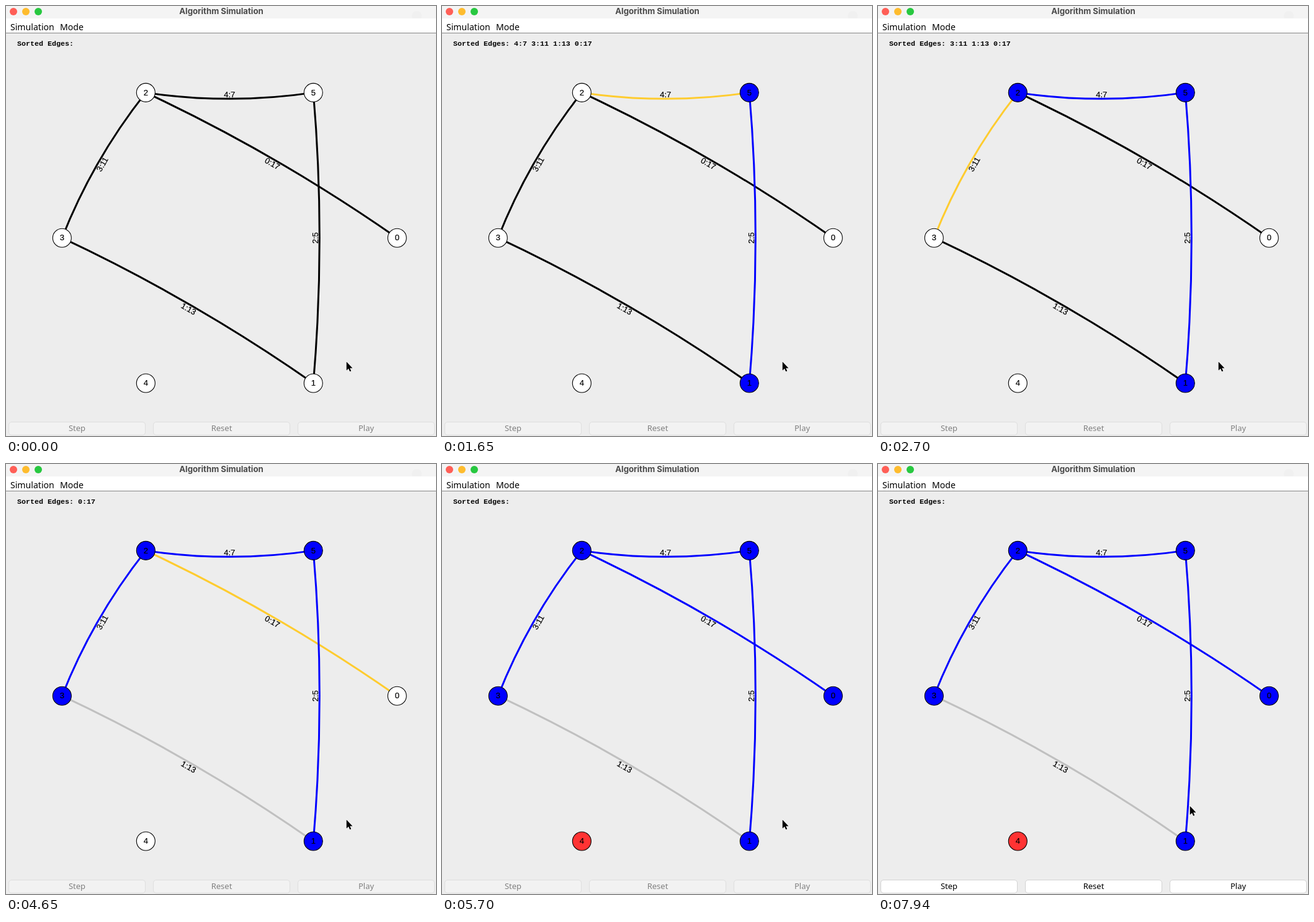
These frames come from a looping animation (693 by 692 pixels, 8 s). An HTML page:

```html
<!DOCTYPE html>
<html lang="en">
<head>
<meta charset="utf-8">
<title>Algorithm Simulation</title>
<style>
  html, body { margin: 0; width: 100%; height: 100%; overflow: hidden; background: #ededed; }
  svg { display: block; width: 100vw; height: 100vh; }
  text { fill: #000; white-space: pre; }
  .title { font: 700 13.2px Inter, sans-serif; fill: #4a4a4a; }
  .menu { font: 500 14.1px "Noto Sans", sans-serif; }
  .queue { font: bold 11.667px "Liberation Mono", monospace; }
  .button { font: 500 13px "Noto Sans", sans-serif; }
  .label { font: 13px "Liberation Sans", Arial, sans-serif; stroke: #000; stroke-width: .2; }
  .mid { text-anchor: middle; }
</style>
</head>
<body>
<svg id="stage" viewBox="0 0 693 692">
  <rect width="693" height="692" fill="#ededed"/>
  <rect width="693" height="20" fill="#f4f4f4"/>
  <circle cx="662" cy="16" r="8" fill="#f0f0f0"/>
  <rect y="20" width="693" height="23" fill="#fff"/>
  <rect y="43" width="693" height="1" fill="#858585"/>
  <circle cx="12" cy="9" r="6" fill="#ff5f57"/>
  <circle cx="32" cy="9" r="6" fill="#febc2e"/>
  <circle cx="52" cy="9" r="6" fill="#28c840"/>
  <text class="title mid" x="347" y="13">Algorithm Simulation</text>
  <text class="menu" x="7" y="39">Simulation</text>
  <text class="menu" x="87" y="39">Mode</text>
  <text class="queue" id="queue" x="18" y="64"></text>
  <g id="edges"></g>
  <g id="labels"></g>
  <g id="nodes"></g>
  <g id="buttons"></g>
  <g id="cursor">
    <path d="M0 0V14L3.3 11L5.4 15.8L7.6 14.8L5.5 10.2H9.8Z" transform="translate(.5 1)" fill="#000" opacity=".2"/>
    <path d="M0 0V14L3.3 11L5.4 15.8L7.6 14.8L5.5 10.2H9.8Z" fill="#000" stroke="#fff" stroke-width="1.4" paint-order="stroke"/>
  </g>
</svg>
<script>
const LOOP = 8000;
const STEPS = [750, 1650, 2700, 3750, 4650, 5700];
const ENABLED_AT = 6750;
const CURSOR = [[0, 548.7, 572.5], [7500, 555.7, 576.5], [7650, 557.7, 578.5], [7940, 502.7, 550.5]];
const BLUE = '#0000ff', YELLOW = '#ffcc2f', GRAY = '#c0c0c0', RED = '#ff3333';

const $ = id => document.getElementById(id);

function add(parent, tag, attrs, text = '') {
  const el = document.createElementNS('http://www.w3.org/2000/svg', tag);
  for (const key in attrs) el.setAttribute(key, attrs[key]);
  el.textContent = text;
  return parent.appendChild(el);
}

// Hexagon corner of each node, counted clockwise from the right.
const nodes = [0, 1, 4, 3, 2, 5].map((corner, i) => {
  const a = corner * Math.PI / 3;
  const x = 360.3 + 270 * Math.cos(a), y = 373.2 + 270 * Math.sin(a);
  const dot = add($('nodes'), 'circle', { cx: x, cy: y, r: 15, stroke: '#000', 'stroke-width': 1.1 });
  add($('nodes'), 'text', { class: 'label mid', x, y: y + 4.2 }, i);
  return { x, y, dot };
});

// Edges in order of weight; each one bows to the left of its direction.
const edges = [[5, 1, '2:5'], [5, 2, '4:7'], [3, 2, '3:11'], [3, 1, '1:13'], [2, 0, '0:17']].map(([a, b, name]) => {
  const p = nodes[a], q = nodes[b];
  const dx = q.x - p.x, dy = q.y - p.y, len = Math.hypot(dx, dy);
  const bow = d => [(p.x + q.x) / 2 + dy / len * d, (p.y + q.y) / 2 - dx / len * d];
  let angle = Math.atan2(dy, dx) * 180 / Math.PI;
  if (angle > 89.9) angle -= 180;
  const line = add($('edges'), 'path', {
    d: `M${p.x} ${p.y}Q${bow(20)} ${q.x} ${q.y}`, fill: 'none', 'stroke-width': 3
  });
  add($('labels'), 'text', {
    class: 'label mid', y: 4.5, transform: `translate(${bow(3)}) rotate(${angle})`
  }, name);
  return { a, b, name, line };
});
[...edges].sort((e, f) => parseInt(e.name) - parseInt(f.name)).forEach(e => $('edges').append(e.line));

const buttons = ['Step', 'Reset', 'Play'].map((name, i) => {
  const x = 4.5 + 233 * i;
  return {
    box: add($('buttons'), 'rect', { x, y: 669.5, width: 220, height: 21, rx: 4.5 }),
    text: add($('buttons'), 'text', { class: 'button mid', x: x + 110, y: 684 }, name)
  };
});

function render(t) {
  const step = STEPS.filter(s => t >= s).length;
  const group = nodes.map((_, i) => i);
  const joined = new Set();

  edges.forEach((e, i) => {
    let color = '#000';
    if (i === step - 1) color = YELLOW;
    else if (i < step - 1) {
      const from = group[e.a], to = group[e.b];
      color = from === to ? GRAY : BLUE;
      group.forEach((g, n) => { if (g === from) group[n] = to; });
      joined.add(e.a).add(e.b);
    }
    e.line.setAttribute('stroke', color);
  });

  const done = step > edges.length;
  nodes.forEach((n, i) => n.dot.setAttribute('fill', joined.has(i) ? BLUE : done ? RED : '#fff'));

  const queue = step ? edges.slice(step - 1).map(e => e.name) : [];
  $('queue').textContent = ['Sorted Edges:', ...queue].join(' ');

  const on = t >= ENABLED_AT;
  for (const { box, text } of buttons) {
    box.setAttribute('fill', on ? '#fff' : '#f2f2f2');
    box.setAttribute('stroke', on ? '#d2d2d2' : '#dedede');
    text.style.fill = on ? '#000' : '#808080';
  }

  const [, x, y] = CURSOR.filter(c => t >= c[0]).pop();
  $('cursor').setAttribute('transform', `translate(${x} ${y})`);
}

const start = performance.now();
function tick() {
  render((performance.now() - start) % LOOP);
  requestAnimationFrame(tick);
}
tick();
</script>
</body>
</html>
```
